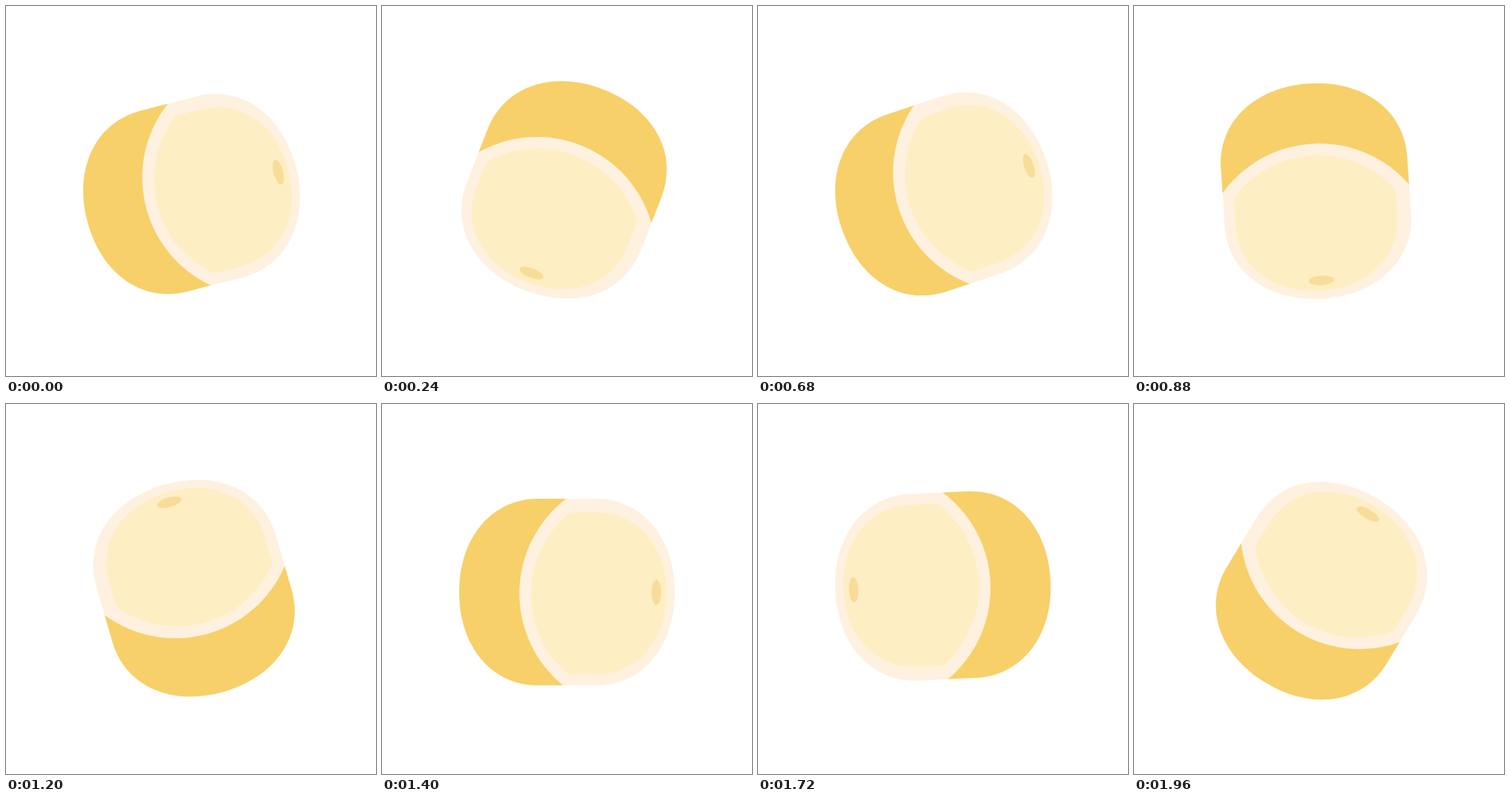
Animation of 500x500 px, one loop 2 s. Source, as an HTML page with a canvas:

```html
<!DOCTYPE html>
<html lang="en">
<head>
<meta charset="utf-8">
<title>Spinning drop</title>
<style>
html, body { margin: 0; width: 100%; height: 100%; overflow: hidden; background: #fff; }
canvas { display: block; width: 500px; height: 500px; }
</style>
</head>
<body>
<canvas id="stage" width="500" height="500"></canvas>
<script>
const ctx = document.getElementById('stage').getContext('2d');
const LOOP = 2000, STEP = 40;

// Key points of the spin: time in ms, angle in degrees.
const SPIN = [[0, -14.3], [1200, 613.8], [1400, 720], [1720, 897.4], [1960, 1021]];

// Rounded end from (x, top) to (x, bottom), reaching out to tip.
function cap(x, top, bottom, tip) {
  const k = 0.585;
  const mid = (top + bottom) / 2, b = (bottom - top) / 2, a = tip - x;
  return `L${x} ${top}C${x + a * k} ${top} ${tip} ${mid - b * k} ${tip} ${mid}` +
         `C${tip} ${mid + b * k} ${x + a * k} ${bottom} ${x} ${bottom}`;
}

// Closed face: rounded end on the right, bulging arc on the left.
function face(x1, x2, top, bottom, start, tip, r) {
  return new Path2D(`M${x1} ${top}${cap(start, top, bottom, tip)}` +
    `L${x2} ${bottom}A${r} ${r} 0 0 1 ${x1} ${top}Z`);
}

const peel = new Path2D(`M-1.2 -122${cap(-39, -122, 130.3, -145.8)}L-5.5 130.3Z`);
const rim = face(-1.2, -5.5, -122, 130.3, 39, 145.5, 161);
const flesh = face(4.8, 2.5, -103.5, 115.5, 40, 134.5, 140.5);
const spot = new Path2D();
spot.ellipse(120.7, 4.5, 6.5, 17, 0, 0, Math.PI * 2);

function angleAt(t) {
  const i = Math.max(1, SPIN.findIndex(([end]) => t <= end));
  const [t0, a0] = SPIN[i - 1], [t1, a1] = SPIN[i];
  return a0 + (a1 - a0) * (t - t0) / (t1 - t0);
}

function fill(color, path) {
  ctx.fillStyle = color;
  ctx.fill(path);
}

function draw(ms) {
  const t = Math.floor((ms % LOOP + 0.5) / STEP) * STEP % LOOP;
  ctx.setTransform(1, 0, 0, 1, 0, 0);
  ctx.fillStyle = '#fff';
  ctx.fillRect(0, 0, 500, 500);
  ctx.translate(250, 250);
  ctx.rotate(angleAt(t) * Math.PI / 180);
  fill('#f7d069', peel);
  fill('#fef1df', rim);
  fill('#feeec3', flesh);
  fill('#f8dc99', spot);
}

const start = performance.now();
function tick() {
  draw(performance.now() - start);
  requestAnimationFrame(tick);
}
tick();
</script>
</body>
</html>
```
